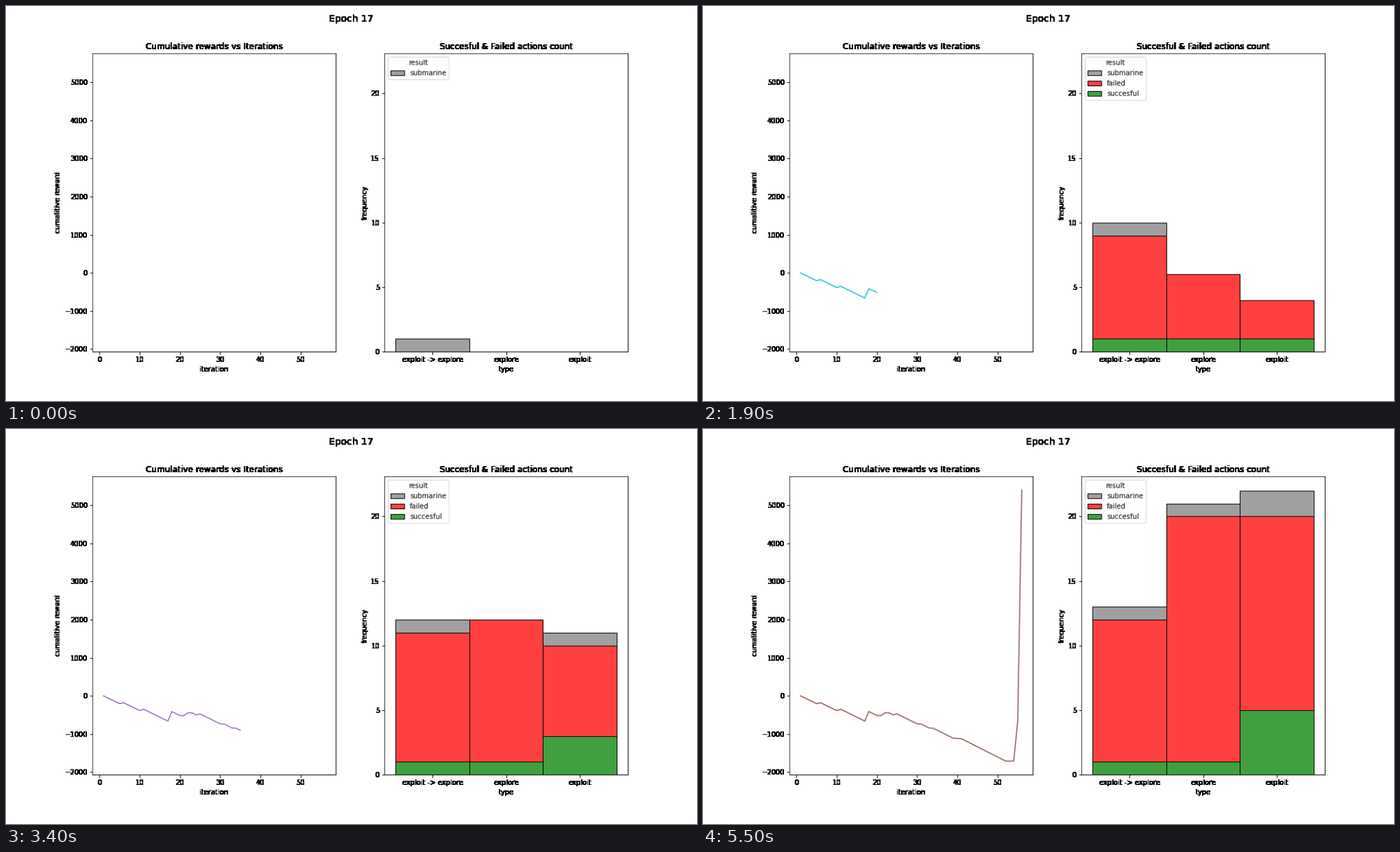
These frames come from a looping animation (990x566 px, 5600 ms). A matplotlib script:

```python
import numpy as np
import matplotlib.pyplot as plt
from matplotlib.animation import FuncAnimation
from matplotlib.colors import to_rgba
from matplotlib.patches import Patch

plt.rcParams["font.family"] = "DejaVu Sans"

DPI = 72
W, H = 990, 566            # stage
PAGE_W, PAGE_H = 1008, 576  # 14 x 8 inch layout, scaled down onto the stage
SX, SY = PAGE_W / W, PAGE_H / H

STEPS = 56
TYPES = ["exploit -> explore", "explore", "exploit"]
COLORS = {"submarine": "gray", "failed": "red", "succesful": "green"}
RESULTS = list(COLORS)
SUB, FAIL, WIN = range(3)

# Notable actions: iteration -> (result, type, reward); all others fail
EVENTS = {
    1: (SUB, 0, 0), 6: (WIN, 0, 25), 11: (WIN, 1, 35), 18: (WIN, 2, 250),
    22: (WIN, 2, 75), 23: (SUB, 2, 0), 25: (WIN, 2, 25), 53: (SUB, 1, 0),
    54: (SUB, 2, 0), 55: (WIN, 2, 1050), 56: (WIN, 2, 6060)}
CHEAP_FAILS = {21, 31, 34, 40, 41}

# How often each type was used by the milestone iterations
MILESTONES = [1, 13, 20, 29, 41, 50, 56]
USES = [(1, 9, 10, 11, 13, 13, 13),
        (0, 3, 6, 10, 13, 19, 21),
        (0, 1, 4, 8, 15, 18, 22)]


def simulate():
    """Return the cumulative reward and the counts [step, result, type]."""
    reward = np.zeros(STEPS)
    counts = np.zeros((STEPS, 3, 3), int)
    for i in range(1, STEPS + 1):
        if i in EVENTS:
            result, kind, gain = EVENTS[i]
        else:
            # a failed action goes to the type furthest behind schedule
            due = [np.interp(i, MILESTONES, uses) for uses in USES]
            result = FAIL
            kind = np.argmax(due - counts.sum(axis=(0, 1)))
            gain = -5 if i in CHEAP_FAILS else -51 - i / 20
        reward[i - 1] = gain
        counts[i - 1, result, kind] = 1
    return reward.cumsum(), counts.cumsum(axis=0)


def to_bytes(img):
    return np.round(img * 255).astype(np.uint8)


def harden(img, dpi):
    """Make every touched pixel opaque, which gives the heavy text."""
    img = to_bytes(img)
    img[..., 3] = np.where(img[..., 3] > 0, 255, 0)
    return img, 0, 0


def resample(img, size, axis):
    n = img.shape[axis]
    pos = (np.arange(size) + 0.5) * n / size - 0.5
    low = pos.astype(int)
    shape = [1] * img.ndim
    shape[axis] = size
    mix = (pos - low).astype(np.float32).reshape(shape)
    return img.take(low, axis) * (1 - mix) + img.take(low + 1, axis) * mix


def shrink(img, dpi):
    """Scale the page, laid out from the lower left corner, to the stage."""
    page = np.ones((PAGE_H, PAGE_W, 4), np.float32)
    page[PAGE_H - H:, :W] = img
    return to_bytes(resample(resample(page, H, 0), W, 1)), 0, 0


def style(ax, title, xlabel, ylabel):
    ax.set_title(title, fontsize=12)
    ax.set_xlabel(xlabel)
    ax.set_ylabel(ylabel)
    ax.set_agg_filter(harden)


def swatch(result):
    return dict(facecolor=to_rgba(COLORS[result], 0.75),
                edgecolor="black", linewidth=1)


iters = np.arange(1, STEPS + 1)
reward, counts = simulate()

fig, (left, right) = plt.subplots(
    1, 2, figsize=(W / DPI, H / DPI), dpi=DPI, facecolor="white")
fig.subplots_adjust(left=0.125 * SX, right=0.9 * SX,
                    bottom=0.125 * SY, top=0.88 * SY, wspace=0.2)
fig.suptitle("Epoch 17", x=0.5 * SX, y=0.98 * SY,
             fontsize=14).set_agg_filter(harden)
fig.set_agg_filter(shrink)

style(left, "Cumulative rewards vs Iterations", "iteration", "cumalitive reward")
pad = 0.05 * np.ptp(reward)
left.set_xlim(-1.75, 58.75)
left.set_ylim(reward.min() - pad, reward.max() + pad)
line, = left.plot([], [], lw=1.5)

style(right, "Succesful & Failed actions count", "type", "frequency")
bars = [right.bar(range(3), [0] * 3, width=1, **swatch(r)) for r in RESULTS]
right.set_xticks(range(3), TYPES)
right.set_xlim(-0.65, 2.65)
right.set_ylim(0, 23.1)


def update(n):
    line.set_data(iters[:n + 1], reward[:n + 1])
    line.set_color(f"C{n % 10}")

    base = np.zeros(3)
    for r in (WIN, FAIL, SUB):
        heights = counts[n, r]
        for bar, y, height in zip(bars[r], base, heights):
            bar.set_y(y)
            bar.set_height(height)
            bar.set_visible(height > 0)
        base = base + heights

    seen = [name for r, name in enumerate(RESULTS) if counts[n, r].any()]
    right.legend([Patch(**swatch(name)) for name in seen], seen,
                 title="result", loc="upper left",
                 fontsize=10, title_fontsize=10)
    return []


anim = FuncAnimation(fig, update, frames=STEPS, interval=100,
                     init_func=lambda: update(0), repeat=True, repeat_delay=0)
plt.show()
```
